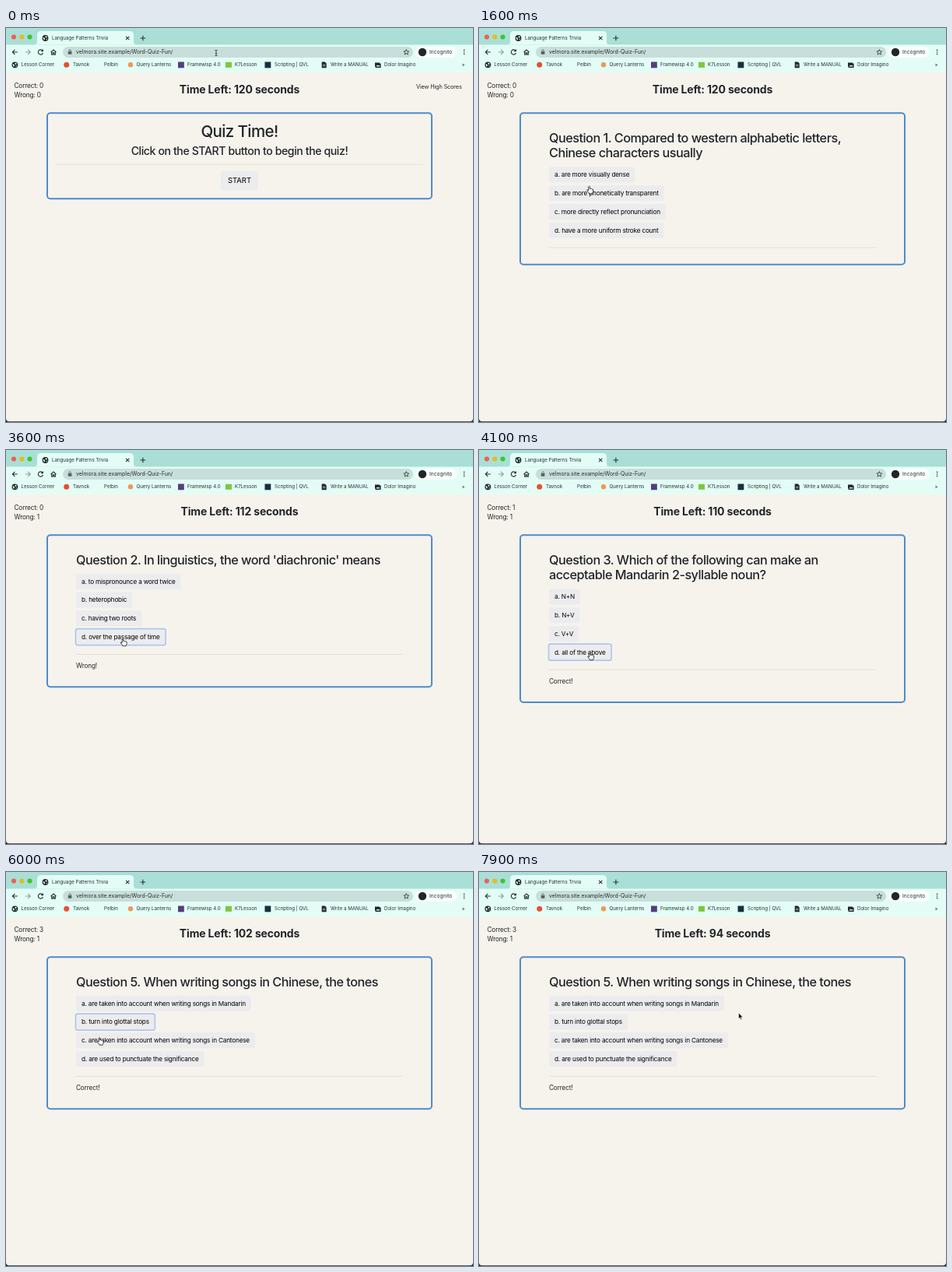
Animation of 600x506 px, one loop 8 s. Source, as an HTML page:

```html
<!DOCTYPE html>
<html lang="en">
<head>
<meta charset="utf-8">
<title>Quiz</title>
<style>
html, body { margin: 0; width: 100%; height: 100%; overflow: hidden; background: #f6f3ec; }
svg { display: block; width: 100vw; height: 100vh; }
text { font-family: Inter, Roboto, "Liberation Sans", sans-serif; fill: #212529; white-space: pre; }
.small { font-size: 6.15px; fill: #24312f; }
.url { font-size: 6.9px; fill: #24312f; }
.body { font-size: 8.25px; letter-spacing: -.02em; }
.link { font-size: 7.3px; letter-spacing: -.02em; }
.option { font-size: 8.2px; letter-spacing: -.022em; fill: #000; }
.timer { font-size: 14px; font-weight: 700; letter-spacing: -.012em; }
.title { font-size: 20.5px; font-weight: 500; letter-spacing: -.03em; }
.lead { font-size: 14.15px; font-weight: 500; letter-spacing: -.03em; }
.question { font-size: 16.25px; font-weight: 500; letter-spacing: -.0316em; }
.start { font-size: 9.5px; fill: #000; }
.mid { text-anchor: middle; }
.line { fill: none; stroke: #26302f; stroke-width: 1.1; }
</style>
</head>
<body>
<svg id="stage" viewBox="0 0 600 506">
  <defs>
    <g id="globe">
      <circle r="3.9" fill="#202627"/>
      <path d="M-2.8-1.2Q-1-.8-.6.4T-1.6 2.8Q-3-.2-2.8-1.2M.4-2.9L2.4-1.7 1.6-.2 0-.9ZM1 1.2L2.8.6 1.5 2.8Z" fill="#e3fdf6"/>
    </g>
  </defs>
  <rect width="600" height="506" fill="#262626"/>
  <rect y="40" width="600" height="465.3" rx="4" fill="#f6f3ec"/>

  <rect width="600" height="30" fill="#a9dfd7"/>
  <rect y="21.5" width="600" height="35.5" fill="#e3fdf6"/>
  <path d="M36 21.6Q40 21.6 40 17.5V9Q40 4 45 4H159Q164 4 164 9V17.5Q164 21.6 168 21.6Z" fill="#e3fdf6"/>
  <circle cx="10" cy="11.5" r="3.1" fill="#ee5f55"/>
  <circle cx="20.3" cy="11.5" r="3.1" fill="#e3bd20"/>
  <circle cx="30.5" cy="11.5" r="3.1" fill="#3fc52f"/>
  <use href="#globe" x="50.5" y="13"/>
  <text class="small" x="59" y="15.2">Language Patterns Trivia</text>
  <path class="line" d="M154 10.8l4.4 4.4m0-4.4l-4.4 4.4M172.6 13h6.6m-3.3-3.3v6.6"/>

  <path class="line" d="M14.8 31H8.4m3-3.1L8.3 31l3.1 3.1"/>
  <path class="line" d="M24.8 31h6.4m-3-3.1l3.1 3.1-3.1 3.1" style="stroke:#87a09c"/>
  <path class="line" d="M47 29.2A3.1 3.1 0 1 0 47.4 32M47.4 27.4v2.4h-2.4"/>
  <path class="line" d="M57.5 31.2L61 28l3.5 3.2M58.7 30.6v3.6h1.5v-2.4h1.6v2.4h1.5v-3.6"/>
  <rect x="73" y="24" width="450" height="14" rx="7" fill="#c8dedb"/>
  <rect x="79.8" y="30" width="4.6" height="3.8" rx=".5" fill="#53615f"/>
  <path d="M80.8 30.2v-1a1.3 1.3 0 0 1 2.6 0v1" fill="none" stroke="#53615f" stroke-width=".8"/>
  <text class="url" x="90" y="33.4">velmora.site.example/Word-Quiz-Fun/</text>
  <path id="star" class="line" style="stroke-width:.8"/>
  <rect x="526" y="24" width="53" height="14" rx="7" fill="#fbfffe"/>
  <circle cx="535" cy="31" r="5.2" fill="#20272b"/>
  <text class="small" style="font-size:6.7px" x="544" y="33.4">Incognito</text>
  <g fill="#26302f"><circle cx="588.6" cy="28.4" r=".8"/><circle cx="588.6" cy="31" r=".8"/><circle cx="588.6" cy="33.6" r=".8"/></g>

  <use href="#globe" x="11.4" y="47.3"/>
  <circle cx="77.7" cy="47.3" r="3.5" fill="#e8512d"/>
  <circle cx="160" cy="47.3" r="3.2" fill="#ee9a55"/>
  <rect x="221" y="43.5" width="7.8" height="7.8" fill="#563d7c"/>
  <rect x="282" y="43.8" width="8" height="7" fill="#7cc83c"/>
  <rect x="332.5" y="43.5" width="7.8" height="7.8" fill="#17303f"/>
  <path d="M405.7 43.6h4l2 2v5.7h-6Z" fill="#202627"/>
  <path d="M407 47.2h3.4m-3.4 1.6h3.4" stroke="#e3fdf6" stroke-width=".6"/>
  <path d="M474 44.4h6v1.2h1.6v5.4h-7v-1.4H474Z" fill="#202627"/>
  <path d="M475.4 49.5l1.6-2 1.2 1 1-1 1.4 2Z" fill="#e3fdf6"/>
  <g id="bookmarks"></g>
  <text class="small" x="585.8" y="49.2">»</text>

  <text class="body" id="correct" x="10.5" y="77"></text>
  <text class="body" id="wrong" x="10.5" y="89.4"></text>
  <text class="timer mid" id="timer" x="300" y="83.8"></text>
  <rect id="card" x="53" y="109.2" width="494" rx="4" fill="none" stroke="#4e8ace" stroke-width="2"/>
  <g id="intro">
    <text class="link" x="527" y="78.1">View High Scores</text>
    <text class="title mid" x="300" y="140.4">Quiz Time!</text>
    <text class="lead mid" x="300" y="163.4">Click on the START button to begin the quiz!</text>
    <path d="M64 175.2H536" stroke="#e1dfd9" stroke-width=".8"/>
    <rect x="276" y="183.8" width="48" height="24.4" rx="2" fill="#ececee"/>
    <text class="start mid" x="300" y="199.4">START</text>
  </g>
  <g id="quiz">
    <text class="question" x="90" y="147"></text>
    <text class="question" x="90" y="166.4"></text>
    <g id="options"></g>
    <path id="rule" d="M90 0H510" stroke="#dddbd8" stroke-width=".8"/>
    <text class="body" id="verdict" x="90"></text>
  </g>

  <g id="cursor" stroke-linejoin="round">
    <path id="arrow" d="M0 0V7.6L1.8 6 3 8.7 4.3 8.1 3.1 5.5H5.5Z" fill="#000" stroke="#fff" stroke-width=".6"/>
    <path id="hand" d="M-.8.8Q0-.5.8.8V3.5Q1.8 2.8 2.4 3.7 3.4 3.1 3.9 4.1 5 3.7 5.1 4.8V6.6Q5 8 4.2 8.8V9.7H-.1V8.9L-2.7 5.8Q-2.9 4.6-1.8 4.8L-.8 5.7Z" fill="#fff" stroke="#111" stroke-width=".8"/>
    <path id="beam" d="M-1.6-3.6Q0-3.6 0-2.8 0-3.6 1.6-3.6M0-2.8V2.8M-1.6 3.6Q0 3.6 0 2.8 0 3.6 1.6 3.6M-.8.8H.8" fill="none" stroke="#222" stroke-width=".8"/>
  </g>
</svg>
<script>
const LOOP = 8000, STEP = 100;
const NS = "http://www.w3.org/2000/svg";
const $ = id => document.getElementById(id);
const set = (el, attrs) => { for (const k in attrs) el.setAttribute(k, attrs[k]); return el; };
const add = (parent, tag, attrs) => set(parent.appendChild(document.createElementNS(NS, tag)), attrs);
const show = (el, on) => el.style.display = on ? "" : "none";

const bookmarks = [[19.5, "Lesson Corner"], [86, "Tavnok"], [126, "Pelbin"], [167.5, "Query Lanterns"],
  [233, "Framewisp 4.0"], [294, "K7Lesson"], [345, "Scripting | QVL"], [417, "Write a MANUAL"], [486, "Dolor Imagino"]];
for (const [x, label] of bookmarks) add($("bookmarks"), "text", { class: "small", x, y: 49.4 }).textContent = label;

const starPoints = Array.from({ length: 10 }, (_, i) => {
  const a = i * Math.PI / 5 - Math.PI / 2, r = i % 2 ? 1.6 : 3.6;
  return (514.3 + r * Math.cos(a)).toFixed(2) + " " + (31.2 + r * Math.sin(a)).toFixed(2);
});
set($("star"), { d: "M" + starPoints.join("L") + "Z" });

const quiz = [
  { at: 1300, correct: 0, wrong: 0, verdict: "",
    lines: ["Question 1. Compared to western alphabetic letters,", "Chinese characters usually"],
    options: ["are more visually dense", "are more phonetically transparent", "more directly reflect pronunciation", "have a more uniform stroke count"] },
  { at: 1800, correct: 0, wrong: 1, verdict: "Wrong!",
    lines: ["Question 2. In linguistics, the word 'diachronic' means"],
    options: ["to mispronounce a word twice", "heterophobic", "having two roots", "over the passage of time"] },
  { at: 3700, correct: 1, wrong: 1, verdict: "Correct!",
    lines: ["Question 3. Which of the following can make an", "acceptable Mandarin 2-syllable noun?"],
    options: ["N+N", "N+V", "V+V", "all of the above"] },
  { at: 4300, correct: 2, wrong: 1, verdict: "Correct!",
    lines: ["Question 4. When language changes, which of the", "following changes least quickly?"],
    options: ["pronunciation", "syntax", "lexicon", "meaning"] },
  { at: 5500, correct: 3, wrong: 1, verdict: "Correct!",
    lines: ["Question 5. When writing songs in Chinese, the tones"],
    options: ["are taken into account when writing songs in Mandarin", "turn into glottal stops",
      "are taken into account when writing songs in Cantonese", "are used to punctuate the significance"] }
];

// Index of the focused option from each time on; -1 is none.
const focusChanges = [[0, -1], [1800, 3], [5400, 1], [7500, -1]];

// Pointer stops: time, x, y.
const path = [[0, 270, 32], [100, 270, 32], [700, 296, 250], [1100, 300, 197], [1300, 300, 197],
  [1600, 141.5, 203], [1700, 143, 256], [1800, 150, 259], [2300, 215, 262], [2800, 209.5, 258],
  [3500, 150, 242], [3700, 150, 242], [4100, 142.5, 260], [4300, 142.5, 260], [4900, 374.5, 165.5],
  [5300, 110, 208], [5500, 110, 208], [6000, 120, 212.5], [6300, 146, 193], [7000, 496, 172],
  [7300, 486, 188], [7900, 333.5, 181], [8000, 333.5, 181]];

const buttons = [0, 1, 2, 3].map(() => {
  const box = add($("options"), "rect", { x: 90, height: 20, rx: 2, fill: "#ececee" });
  const ring = add($("options"), "rect", { x: 89.5, height: 21, rx: 2.5, fill: "none", stroke: "#afc6f0", "stroke-width": 1.7 });
  const label = add($("options"), "text", { class: "option", x: 97 });
  return { box, ring, label };
});
const headings = document.querySelectorAll(".question");

const latest = (list, t, time) => list.filter(item => time(item) <= t).pop();

function pointerAt(t) {
  const i = path.findIndex(stop => stop[0] > t);
  const [t0, x0, y0] = path[i - 1], [t1, x1, y1] = path[i];
  const u = (t - t0) / (t1 - t0), e = u * u * (3 - 2 * u);
  return [x0 + (x1 - x0) * e, y0 + (y1 - y0) * e];
}

// Lays out one question and returns the clickable areas.
function drawQuestion(q, focus) {
  const top = q.lines.length > 1 ? 178.4 : 158.8;
  const ruleY = top + 103.6;
  headings.forEach((h, i) => h.textContent = q.lines[i] || "");
  set($("rule"), { transform: `translate(0 ${ruleY})` });
  set($("verdict"), { y: ruleY + 17.6 }).textContent = q.verdict;
  set($("card"), { height: ruleY - 87 + (q.verdict ? 20.2 : 0) - 0.5 + 0 - 0 - 0 });
  return buttons.map(({ box, ring, label }, i) => {
    const y = top + 23.75 * i;
    set(label, { y: y + 12.9 }).textContent = "abcd"[i] + ". " + q.options[i];
    const width = label.getComputedTextLength() + 14;
    set(box, { y, width });
    set(ring, { y: y - 0.5, width: width + 1 });
    show(ring, i === focus);
    return [90, y, width, 20];
  });
}

function draw(t) {
  const q = latest(quiz, t, item => item.at);
  const focus = latest(focusChanges, t, item => item[0])[1];
  show($("intro"), !q);
  show($("quiz"), q);
  $("correct").textContent = "Correct: " + (q ? q.correct : 0);
  $("wrong").textContent = "Wrong: " + (q ? q.wrong : 0);
  $("timer").textContent = `Time Left: ${Math.min(120, Math.floor(126.5 - t / 250))} seconds`;

  let areas = [[276, 183.8, 48, 24.4]];
  if (q) areas = drawQuestion(q, focus);
  else set($("card"), { height: 110 });

  const [x, y] = pointerAt(t);
  const onButton = areas.some(([ax, ay, w, h]) => x >= ax && x <= ax + w && y >= ay && y <= ay + h);
  const onAddress = y > 24 && y < 38;
  set($("cursor"), { transform: `translate(${x} ${y})` });
  show($("hand"), onButton);
  show($("beam"), onAddress);
  show($("arrow"), !onButton && !onAddress);
}

const begin = performance.now();
function tick() {
  const t = (performance.now() - begin) % LOOP;
  draw(Math.floor(t / STEP) * STEP);
  requestAnimationFrame(tick);
}
tick();
</script>
</body>
</html>
```
